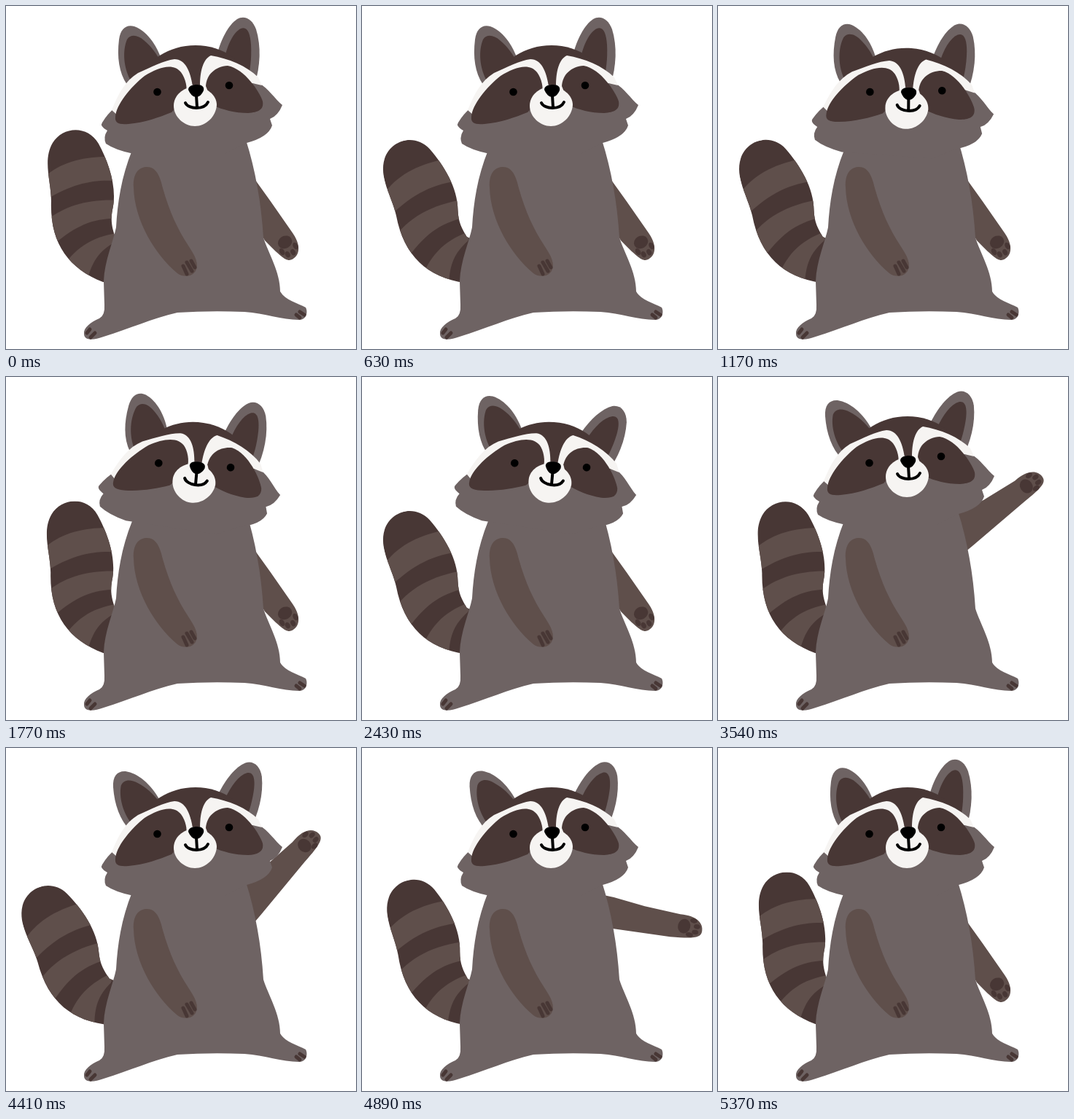
Recreate the animation shown at these times as an HTML page. Size 480 by 471 pixels, loop 5.4 s.

```html
<!DOCTYPE html>
<html lang="en">
<head>
<meta charset="utf-8">
<title>Waving raccoon</title>
<style>
  html, body { margin: 0; width: 100%; height: 100%; overflow: hidden; background: #fff; }
  svg { display: block; width: 100%; height: 100%; }
  .fur { fill: #6e6363; }
  .limb { fill: #5f4f4b; }
  .dark { fill: #483735; }
  .white { fill: #f6f4f2; }
  .claw { fill: none; stroke: #483735; stroke-width: 5; stroke-linecap: round; }
  .mouth { fill: none; stroke: #000; stroke-width: 4; stroke-linecap: round; }
</style>
</head>
<body>
<svg viewBox="0 0 480 471">
  <defs>
    <clipPath id="tailShape">
      <path d="M150 318C146 306 143 296 146 280C153 250 141 215 127 189C112 163 78 165 64 188C50 212 62 240 62 268C60 325 85 360 133 379L165 379V330Z"/>
    </clipPath>
  </defs>

  <g id="tail">
    <g clip-path="url(#tailShape)">
      <path class="dark" d="M40 150H170V400H40Z"/>
      <path class="limb" d="M50 237C75 214 105 207 140 207L160 241C122 237 92 243 52 268Z"/>
      <path class="limb" d="M50 299C78 275 110 264 160 267V292C122 290 98 300 66 327Z"/>
      <path class="limb" d="M78 358C98 329 122 315 160 311L150 324C128 336 119 350 112 374Z"/>
    </g>
  </g>

  <g id="arm">
    <path id="sleeve" class="limb"/>
    <g class="dark">
      <ellipse cx="120.500" cy="0" rx="8.500" ry="10"/>
      <ellipse cx="130" cy="10" rx="5" ry="3.300"/>
      <ellipse cx="137" cy="5" rx="4.500" ry="3.200"/>
      <ellipse cx="138" cy="-3" rx="4.500" ry="3.200"/>
      <ellipse cx="132" cy="-10" rx="5" ry="3.300"/>
    </g>
  </g>

  <path class="fur" d="M173 198C158 235 153 270 151 304C147 324 135 350 134 378L135 410Q136 425 128 429C116 434 106 442 107 450C107 460 120 459 134 454C170 443 200 429 235 421Q280 418 327 420C355 422 378 431 402 431C413 431 414 419 411 414C400 408 383 404 376 392C376 365 360 340 353 318C350 270 342 225 329 184Z"/>
  <path class="claw" stroke-width="4" d="M111 449L115 444M116 455L122 449M409 424L403 420M403 428L398 424"/>

  <path class="limb" d="M192 221C179 222 174 234 175 249C176 295 205 342 235 367C243 373 255 372 260 364C265 354 260 344 250 329C235 306 224 282 215 250C211 232 205 220 192 221Z"/>
  <path class="claw" d="M243 357L248 368M248 352L255 364M254 350L259 359"/>

  <g id="head">
    <g id="earL">
      <path class="fur" d="M166 108C155 92 152 70 155 46C157 31 165 25 176 28C192 34 206 51 214 76Z"/>
      <path class="dark" d="M173 106C160 85 160 60 166 46C171 38 181 40 189 47C200 56 207 66 214 80Z"/>
    </g>
    <g id="earR">
      <path class="fur" d="M289 68C295 45 305 26 317 18C327 12 338 18 343 32C350 55 349 82 341 108Z"/>
      <path class="dark" d="M299 74C304 52 312 36 322 31C331 27 335 38 336 53C337 72 335 90 330 106Z"/>
    </g>
    <path class="dark" d="M176 100C196 75 222 54 260 54C298 54 326 76 350 110L300 130H210Z"/>
    <path class="fur" d="M180 98L151 138Q139 148 132 160Q128 165 139 171Q133 180 137 189Q150 198 175 203H300L330 188Q360 180 365 164L362 155Q373 151 379 136C369 128 360 113 347 106L270 108H250Z"/>
    <path class="white" d="M145 143C154 121 163 103 181 92C199 84 216 75 231 73C246 73 253 90 256 110L266 110C266 90 270 73 281 68C305 72 330 82 346 98L351 109L338 106L270 130H200L154 151Z"/>
    <path class="dark" d="M150 152C151 136 170 112 190 96C210 83 230 78 240 91C246 99 250 113 246 122C236 128 232 143 227 146C210 153 190 160 168 162C155 163 149 161 150 152Z"/>
    <path class="dark" d="M274 110C275 94 287 83 304 82C327 86 348 118 352 131C354 142 346 146 332 147C314 147 296 142 285 137Z"/>
    <path class="white" d="M260 110C274 112 289 121 289 136C288 152 274 165 259 165C244 165 230 152 230 137C230 123 242 112 260 110Z"/>
    <path d="M250 115C250 109 257 108 262 108C269 108 272 111 271 116C269 121 265 125 261 125C256 125 252 120 250 115Z"/>
    <path class="mouth" d="M261 123L262 139M246 133C250 142 272 143 277 132"/>
    <circle cx="207.500" cy="118" r="5.300"/>
    <circle cx="306" cy="109" r="5.300"/>
  </g>
</svg>
<script>
  const LOOP = 5400;
  const $ = id => document.getElementById(id);

  // Each track is a list of [time, value], joined by straight lines.
  const tracks = {
    tail: [[0, 0], [900, -18.3], [1800, 0], [2700, -18.3], [3600, 0], [4500, -18.3], [5400, 0]],
    head: [[900, 0], [1470, 8.7], [2430, 8.7], [2990, 0]],
    ears: [[1800, 0], [2100, 11.4], [4850, 11.4], [5350, 0]],
    arm: [[2520, 60.9], [3352, -61], [3700, -13], [4290, -61], [4650, -13], [5355, 60.9]]
  };

  function sample(keys, t) {
    const i = keys.findIndex(k => k[0] > t);
    if (i < 0) return keys[keys.length - 1][1];
    if (!i) return keys[0][1];
    const [t0, a] = keys[i - 1], [t1, b] = keys[i];
    return a + (b - a) * (t - t0) / (t1 - t0);
  }

  function turn(id, angle, x, y) {
    $(id).setAttribute("transform", `rotate(${angle} ${x} ${y})`);
  }

  function draw(now) {
    const t = now % LOOP;
    const ears = sample(tracks.ears, t);
    const arm = sample(tracks.arm, t);
    turn("tail", sample(tracks.tail, t), 142, 345);
    turn("head", sample(tracks.head, t), 207, 130);
    turn("earL", -ears, 190, 90);
    turn("earR", ears, 310, 75);

    // The shoulder widens as the arm goes up.
    const lift = Math.min(1, (60.9 - arm) / 74);
    const top = -5 - 20 * lift;
    const low = 23 - 7 * lift;
    $("arm").setAttribute("transform", `translate(324 219) rotate(${arm})`);
    $("sleeve").setAttribute("d",
      `M0 ${top}L18 ${top}L62 ${-10 - 8 * lift}L112 -15C135 -18 146 -9 146 2C146 11 138 14 105 ${low}L13 25L0 26Z`);
    requestAnimationFrame(() => draw(performance.now() - start));
  }

  const start = performance.now();
  draw(0);
</script>
</body>
</html>
```
